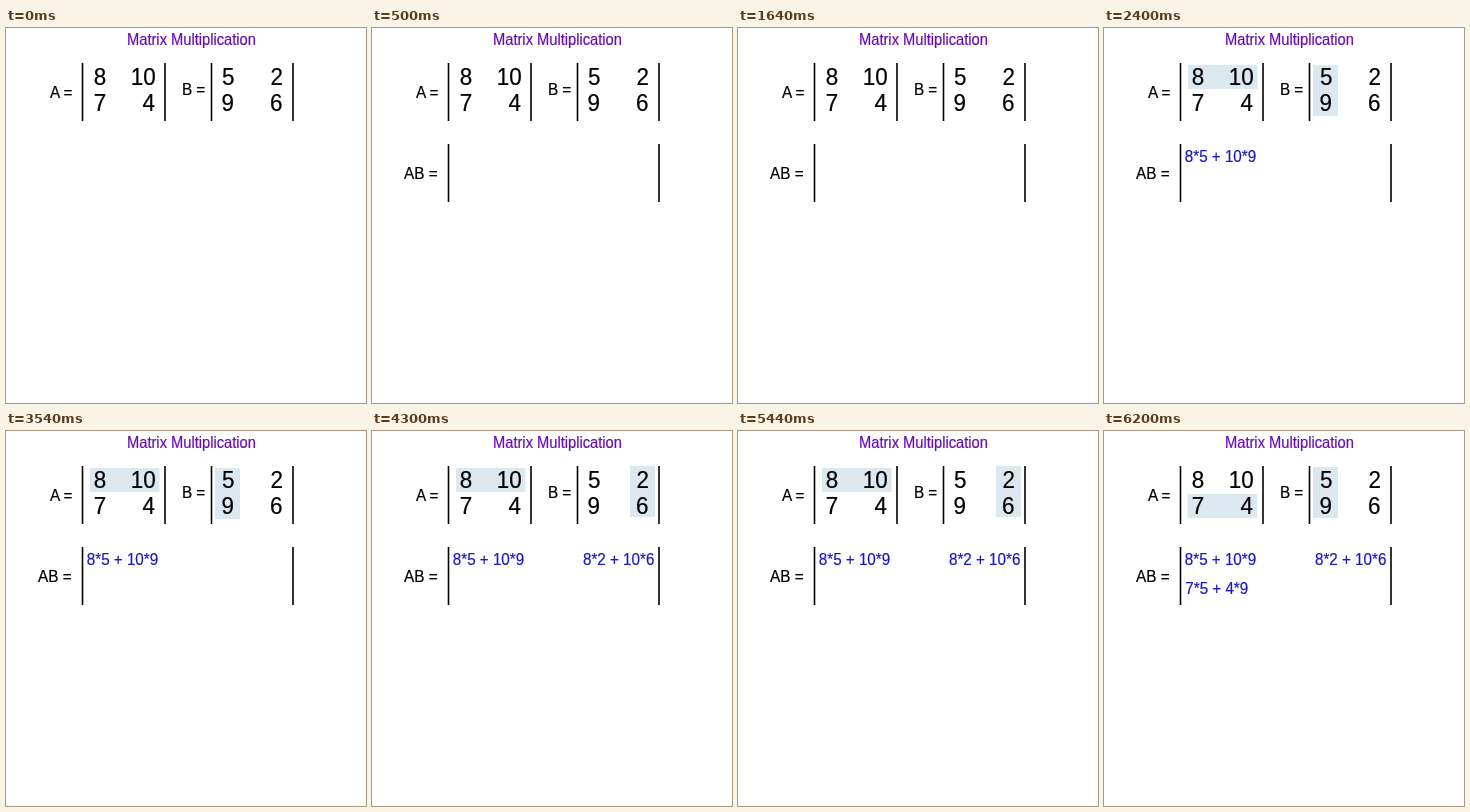
An HTML page that plays this animation: 360 px wide and 375 px high, repeating every 8000 ms.

```html
<!DOCTYPE html>
<html lang="en">
<head>
<meta charset="utf-8">
<title>Matrix Multiplication</title>
<style>
  html, body { margin: 0; width: 100%; height: 100%; overflow: hidden; background: #fff; }
  svg { display: block; width: 100%; height: 100%; }
  text { font-family: "Liberation Sans", Arial, sans-serif; white-space: pre; stroke-width: .2px; }
  .title { font-size: 14.7px; fill: #6a0cb4; stroke: #6a0cb4; }
  .label { font-size: 15.3px; fill: #000; stroke: #000; }
  .cell { font-size: 22.4px; fill: #000; stroke: #000; text-anchor: middle; }
  .term { font-size: 15.2px; fill: #1a1abf; stroke: #1a1abf; }
  .bar { stroke: #000; stroke-width: 1.6; }
  .mark { fill: #dce8f0; }
</style>
</head>
<body>
<svg id="stage" viewBox="0 0 360 375"></svg>
<script>
const LOOP = 8000;
const FRAME = 500, FIRST = 2400, SECOND = 4300, THIRD = 6200;
const stage = document.getElementById("stage");
const timed = [];

// Adds an element; spans are [from, to] times in ms when it is visible.
function add(tag, attrs, content, spans) {
  const el = document.createElementNS("http://www.w3.org/2000/svg", tag);
  for (const key in attrs) el.setAttribute(key, attrs[key]);
  if (content) el.textContent = content;
  if (spans.length) timed.push({ el, spans });
  stage.append(el);
}

// Small lettering is slightly taller than the font's normal proportions.
function text(cls, x, y, content, ...spans) {
  const tall = cls === "cell" ? 1.03 : 1.08;
  add("text", { class: cls, transform: `translate(${x} ${y}) scale(1 ${tall})` }, content, spans);
}

function bar(x, y, ...spans) {
  add("line", { class: "bar", x1: x, x2: x, y1: y, y2: y + 58 }, "", spans);
}

function mark(x, y, width, height, ...spans) {
  add("rect", { class: "mark", x, y, width, height }, "", spans);
}

function matrix(cells) {
  for (const [x, row, value] of cells) text("cell", x, 57 + 26 * row, value);
}

add("rect", { x: 0, y: 374, width: 360, height: 1, fill: "#f8f8f8" }, "", []);

// Row of A and column of B used by each product
mark(84, 37, 69.5, 24, [FIRST, THIRD]);
mark(83.5, 63, 69.5, 24, [THIRD, LOOP]);
mark(209, 37, 25, 51, [FIRST, SECOND]);
mark(258, 35, 25, 51, [SECOND, THIRD]);
mark(209, 36, 25, 51, [THIRD, LOOP]);

text("title", 121, 17, "Matrix Multiplication");

text("label", 44, 70.3, "A =");
text("label", 175.9, 67.3, "B =");
[76.5, 159, 205.5, 287].forEach(x => bar(x, 35));

matrix([[94, 0, "8"], [137.3, 0, "10"], [94, 1, "7"], [142.6, 1, "4"]]);
matrix([[222.3, 0, "5"], [270.8, 0, "2"], [221.8, 1, "9"], [270.2, 1, "6"]]);

text("label", 32, 151, "AB =", [FRAME, LOOP]);
bar(76.5, 116, [FRAME, LOOP]);
bar(287, 116, [FRAME, LOOP]);
text("term", 80.8, 134, "8*5 + 10*9", [FIRST, LOOP]);
text("term", 211, 134, "8*2 + 10*6", [SECOND, LOOP]);
text("term", 81.3, 163, "7*5 + 4*9", [THIRD, LOOP]);

function draw(t) {
  for (const { el, spans } of timed) {
    const shown = spans.some(([from, to]) => t >= from && t < to);
    el.setAttribute("visibility", shown ? "visible" : "hidden");
  }
}

const start = performance.now();
function tick() {
  draw((performance.now() - start) % LOOP);
  requestAnimationFrame(tick);
}
tick();
</script>
</body>
</html>
```
